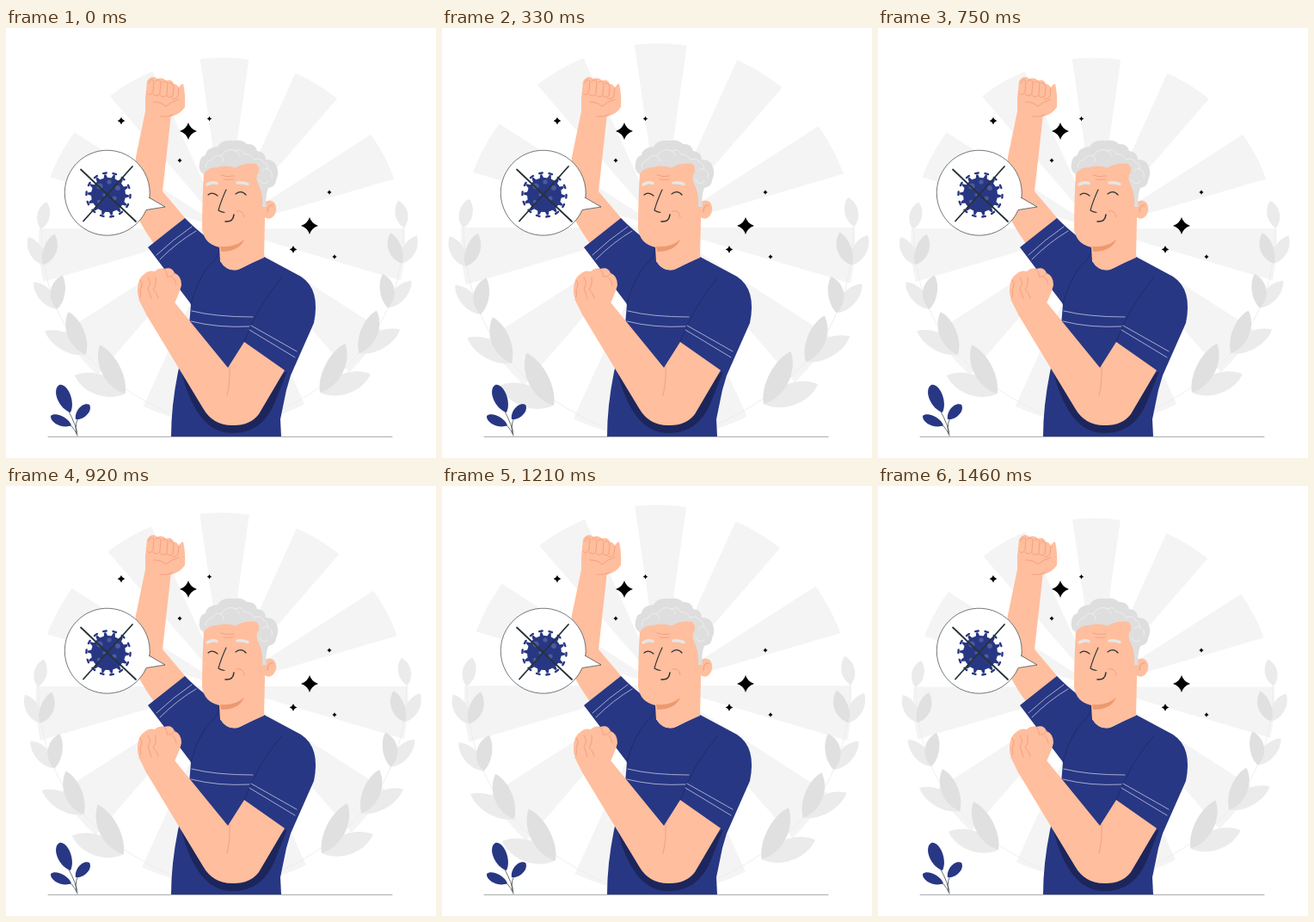
Recreate the animation shown at these times as an HTML page with a canvas. Size 500x500 px, loop 1500 ms.

```html
<!DOCTYPE html>
<html lang="en">
<head>
<meta charset="utf-8">
<title>Recovered and cheering</title>
<style>
  html, body { margin: 0; width: 100%; height: 100%; overflow: hidden; background: #fff; }
  canvas { display: block; width: 500px; height: 500px; }
</style>
</head>
<body>
<canvas id="stage"></canvas>
<script>
const canvas = document.getElementById('stage');
const ctx = canvas.getContext('2d');
const ratio = window.devicePixelRatio || 1;
canvas.width = canvas.height = 500 * ratio;

const LOOP = 1500, STEPS = 36;
const SKIN = '#ffbe9d', CREASE = '#f0997a', SHIRT = '#283783', SHADE = '#1c265c',
      INK = '#263238', HAIR = '#dedede', PALE = '#ebebeb', GREY = '#e0e0e0';

function fill(d, color) {
  ctx.fillStyle = color;
  ctx.fill(new Path2D(d));
}

function line(d, color, width = 1) {
  ctx.strokeStyle = color;
  ctx.lineWidth = width;
  ctx.lineCap = ctx.lineJoin = 'round';
  ctx.stroke(new Path2D(d));
}

function disc(x, y, r, color) {
  ctx.fillStyle = color;
  ctx.beginPath();
  ctx.arc(x, y, r, 0, 7);
  ctx.fill();
}

// Leaf growing from a base to a tip; the two sides may bulge differently,
// and a reach near 1 makes the tip rounder.
function leaf(bx, by, tx, ty, left, right, color, reach = 0.75) {
  const dx = tx - bx, dy = ty - by, len = Math.hypot(dx, dy);
  const at = (k, side) => [bx + dx * k + dy / len * side, by + dy * k - dx / len * side];
  ctx.fillStyle = color;
  ctx.beginPath();
  ctx.moveTo(bx, by);
  ctx.bezierCurveTo(...at(0.25, left), ...at(reach, left), tx, ty);
  ctx.bezierCurveTo(...at(reach, -right), ...at(0.25, -right), bx, by);
  ctx.fill();
}

function sparkle(x, y, r) {
  const k = r * 0.24;
  fill(`M${x} ${y - r}Q${x + k} ${y - k} ${x + r} ${y}Q${x + k} ${y + k} ${x} ${y + r}` +
       `Q${x - k} ${y + k} ${x - r} ${y}Q${x - k} ${y - k} ${x} ${y - r}`, '#000');
}

// The rays meet above the middle of the disc that cuts them off.
function rays() {
  const count = 11, half = Math.PI / count / 2;
  ctx.save();
  ctx.beginPath();
  ctx.arc(251, 247.5, 210, 0, 7);
  ctx.clip();
  ctx.fillStyle = '#f4f4f4';
  for (let i = 0; i < count; i++) {
    const a = i * 2 * Math.PI / count - Math.PI / 2;
    ctx.beginPath();
    ctx.moveTo(254, 233.5);
    ctx.arc(254, 233.5, 300, a - half, a + half);
    ctx.fill();
  }
  ctx.restore();
}

function branch() {
  line('M44 234C45 310 72 391 190 445', PALE, 0.8);
  leaf(43.5, 234, 50, 203, 10, 9, PALE);
  leaf(46, 275, 29, 243, 10, 10, PALE);
  leaf(46, 275, 59, 240, 8, 12, GREY);
  leaf(62, 326, 35, 295, 10, 11, PALE);
  leaf(62, 326, 68, 287, 14, 8, GREY);
  leaf(96, 378, 48, 351, 12, 14, PALE);
  leaf(95, 378, 75, 329, 15, 11, GREY);
  leaf(140, 423, 82, 402, 16, 15, PALE);
  leaf(140, 423, 111, 367, 17, 12, GREY);
}

function backdrop(scale) {
  ctx.save();
  ctx.translate(250, 250);
  ctx.scale(scale, scale);
  ctx.translate(-250, -250);
  rays();
  branch();
  ctx.translate(503.5, -1.5);
  ctx.scale(-1, 1);
  branch();
  ctx.restore();
}

function ground() {
  line('M49 475.3H449', '#8a8f92', 0.8);
  line('M83 474Q82 462 72 444M82 470Q79 458 87 449M82 472Q78 462 70 459', INK, 0.7);
  leaf(75, 447, 62, 415, 11, 10, SHIRT, 0.95);
  leaf(81, 455, 97, 438, 8, 8, SHIRT, 0.9);
  leaf(76, 462, 52, 451, 8, 7, SHIRT, 0.9);
}

function raisedArm() {
  fill('M162 97L151 150L146 200Q151 222 173 252L210 223L182 190L192 100Z', SKIN);
  fill('M162 102L162 82L164 62Q169 54 176 59Q182 57 186 61Q193 59 195 65Q199 65 201 70' +
       'Q203 65 206 65Q209 78 208 92Q203 100 192 103Z', SKIN);
  line('M166 64Q168 57 172 62L171 74Q168 80 164 76M174 62Q178 58 180 63L179 76Q176 81 171 77' +
       'M182 63Q186 60 188 65L187 78Q183 82 179 78M190 64Q195 63 195 70L194 79Q190 82 187 79' +
       'M201 69L200 79Q197 84 193 82M172 86Q181 86 186 91Q193 85 201 83M180 103Q187 104 194 101',
       CREASE, 0.8);
}

function torso() {
  fill('M208 221L165 255L215 321L213 346L200 400Q192 440 192 475H320L319 455L326 421L331 404' +
       'L358 343Q366 304 343 289L300 266L272 280Q258 285 249 271V253Q232 245 208 221Z', SHIRT);
  line('M248 257Q247 267 239 273Q224 288 215 321M277 365Q291 326 320 291', SHADE, 0.7);
  line('M175 264Q194 246 216 231M179 269Q199 249 221 236M216 329Q244 336 287 336' +
       'M215 341Q247 349 283 347M285 346L338 376M283 351L336 383', '#c5cae4', 0.8);
}

function head() {
  fill('M230 168Q228 205 228 233Q230 251 248 255L249 271Q257 284 270 281Q286 273 300 267' +
       'L302 180L290 150L240 152Z', SKIN);
  fill('M300 203Q307 198 312 203Q317 211 311 219Q306 224 301 220Z', SKIN);
  line('M304 214Q304 205 310 206', CREASE);
  fill('M249 254Q265 256 277 246Q271 260 250 260Z', '#ed996f');
  fill('M230 170Q223 166 225 157Q226 149 232 148Q233 139 246 138Q251 129 264 131Q275 129 280 135' +
       'Q290 134 292 143Q302 144 302 153Q313 153 315 162Q318 168 314 177Q314 184 305 186' +
       'Q301 197 303 208L298 208Q299 193 294 183Q289 174 294 167Q295 157 287 157.5' +
       'Q276 157 267 162.5Q255 159 246 162Q236 161 230 170Z', HAIR);
  line('M232 162Q232 155 240 153Q243 146 250 149Q257 138 267 143Q274 139 278 147Q284 146 289 153' +
       'M250 149Q253 151 253 155M267 143Q272 146 271 149M289 153Q296 150 299 156' +
       'Q306 158 304 164Q311 167 309 174M304 164Q300 163 298 166M305 179Q297 184 295 176', '#f0f0f0', 0.9);
  line('M234 182Q240 178.5 245 180.5M269 180Q275 179 281 181.5', '#e6e6e6', 3.4);
  line('M235 194Q240 190 246 195M267 193Q274 188 279 194', INK, 1.2);
  line('M256 188Q250 201 247 212Q250 214 254 214.5', INK, 1.1);
  line('M255 225Q264 226 265 217', INK, 1.5);
  line('M250 171Q257 174 265 172M253 176Q259 177 264 176M268 213Q276 211 277 220', CREASE, 0.8);
}

function frontArm() {
  fill('M204 400Q222 472 264 471Q297 471 312 437L327 399L300 420L225 420Z', SHADE);
  fill('M154 315L163 333L229 442Q241 463 265 462Q284 462 294 449L324 398L277 365L258 395L196 319Z', SKIN);
  fill('M160 324Q152 313 153 304Q153 291 161 286Q166 281 173 283Q178 278 184 280Q193 277 196 285' +
       'Q204 288 204 299Q202 307 196 320Q178 332 160 324Z', SKIN);
  line('M260 393Q261 411 257 427M156 293Q160 298 156 304Q157 310 156 313M165 290Q170 296 165 303' +
       'Q168 310 169 315M174 290Q175 300 171 304Q175 307 177 314M183 280Q188 283 187 289' +
       'Q194 290 196 285M194 290Q197 293 198 299', CREASE, 0.8);
}

function virus() {
  const x = 119, y = 194, spikes = 14;
  for (let i = 0; i < spikes; i++) {
    ctx.save();
    ctx.translate(x, y);
    ctx.rotate(i * 2 * Math.PI / spikes - 0.16);
    fill('M-2.5 -19L-1 -24H1L2.5 -19Z', SHIRT);
    line('M-1.8 -25.5H1.8', SHIRT, 2.4);
    ctx.restore();
  }
  disc(x, y, 20, SHIRT);
  const spots = [[109, 184, 3.6], [120, 179, 2.6], [130, 186, 3], [114, 194, 1.8],
                 [126, 198, 2.6], [108, 202, 2.2]];
  for (const [sx, sy, r] of spots) disc(sx, sy, r, '#4d5a9b');
  line('M87 164.5L151 225M147 161L90 224.5', INK, 1.8);
}

function bubble() {
  const shape = 'M166.9 197.5L185 208L163.1 211.5A49.5 49.5 0 1 1 166.9 197.5Z';
  fill(shape, '#fff');
  line(shape, INK, 0.65);
  virus();
}

function sparkles() {
  const stars = [[212, 120, 10], [353, 230, 10], [134, 108, 4.3], [334, 257.5, 4.3],
                 [236.5, 105.5, 2.7], [202, 154, 2.7], [376, 191, 2.7], [382, 266, 2.7]];
  for (const star of stars) sparkle(...star);
}

// Two uneven beats per loop, each stretch slowing slightly towards its end.
const BEATS = [[0, 0], [8, 1], [21, 0], [28, 1], [36, 0]];

function beat(step) {
  const i = BEATS.findIndex(([end]) => step <= end);
  const [start, from] = BEATS[i - 1], [end, to] = BEATS[i];
  const eased = 1 - Math.pow(1 - (step - start) / (end - start), 1.1);
  return from + (to - from) * eased;
}

function draw(time) {
  const step = Math.floor((time % LOOP + 4) * STEPS / LOOP) % STEPS;
  ctx.setTransform(ratio, 0, 0, ratio, 0, 0);
  ctx.fillStyle = '#fff';
  ctx.fillRect(0, 0, 500, 500);
  backdrop(1 + 0.1 * beat(step + 1));
  ground();
  raisedArm();
  torso();
  head();
  frontArm();
  bubble();
  sparkles();
}

const began = performance.now();
function tick() {
  draw(performance.now() - began);
  requestAnimationFrame(tick);
}
tick();
</script>
</body>
</html>
```
